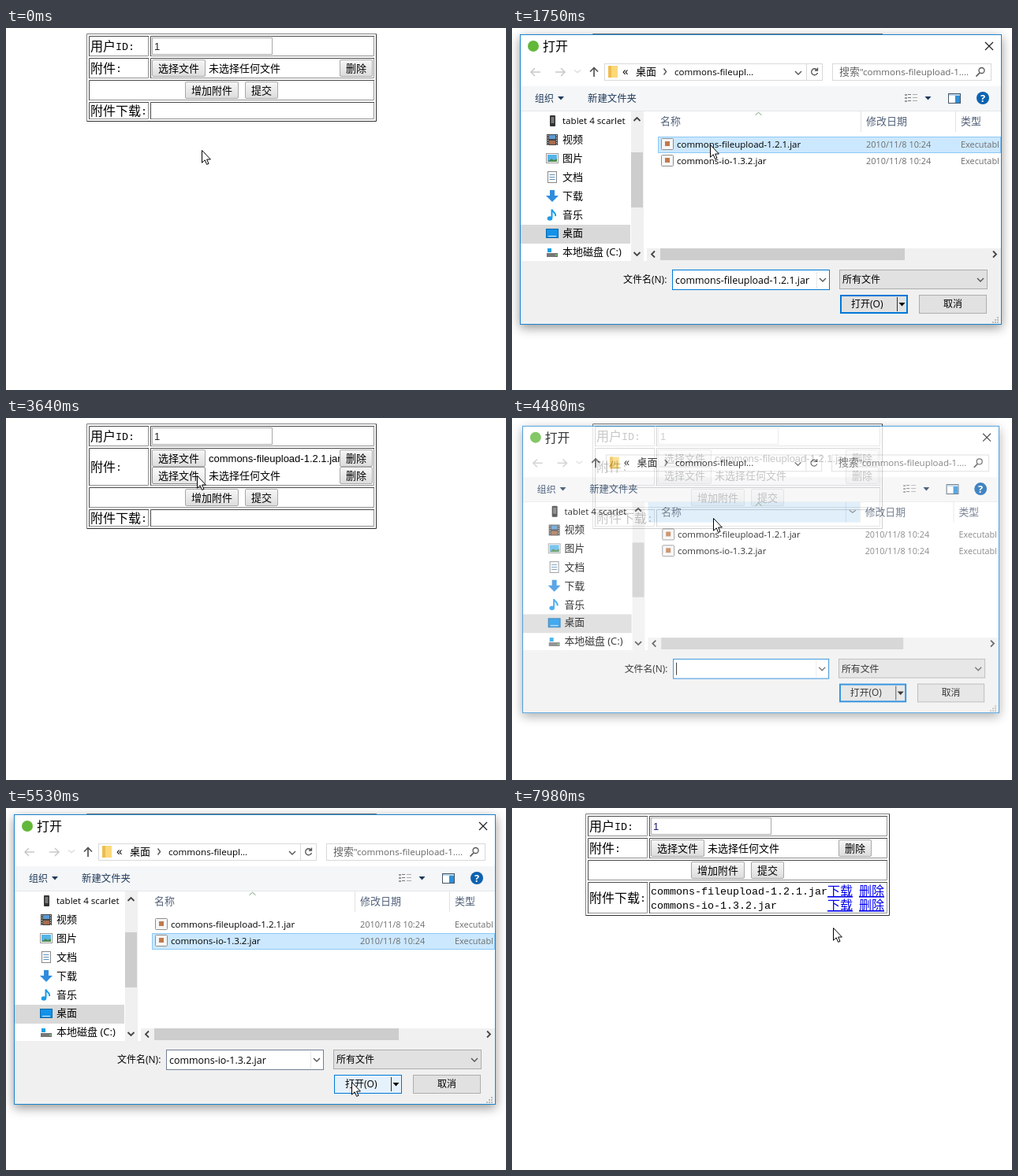
Write an HTML page that moves like this. It is 634x460 px and loops after 8000 ms.

```html
<!DOCTYPE html>
<html lang="zh">
<head>
<meta charset="utf-8">
<title>附件上传</title>
<style>
html, body { margin: 0; width: 100%; height: 100%; overflow: hidden; background: #fff; }
svg { display: block; width: 634px; height: 460px; }
text { white-space: pre; }
.ui { font-family: "Open Sans", "Noto Sans CJK SC", "Noto Sans CJK", sans-serif; }
.form { font-family: "Liberation Sans", "Noto Sans CJK SC", "Noto Sans CJK", sans-serif; }
.label { font-family: "Noto Sans CJK SC", "Noto Sans CJK", sans-serif; font-weight: 300; }
.mono { font-family: "Liberation Mono", monospace; }
.link { text-decoration: underline; text-decoration-thickness: 1px; }
.shadow { filter: drop-shadow(0 4px 7px rgba(0,0,0,.42)); }
</style>
</head>
<body>
<svg id="stage" viewBox="0 0 634 460">
  <defs>
    <linearGradient id="up" x2="0" y2="1"><stop stop-color="#f6f6f6"/><stop offset="1" stop-color="#dcdcdc"/></linearGradient>
    <linearGradient id="over" x2="0" y2="1"><stop stop-color="#fcfcfc"/><stop offset="1" stop-color="#e6e6e6"/></linearGradient>
    <linearGradient id="down" x2="0" y2="1"><stop stop-color="#d6d6d6"/><stop offset="1" stop-color="#ececec"/></linearGradient>
  </defs>
  <g id="page"></g>
  <g id="dialog"></g>
  <path id="cursor" d="M.5.5V16.2L4.2 12.8 6.6 18.4 9 17.4 6.6 12H11.4Z" fill="#fff" stroke="#000"/>
</svg>
<script>
const LOOP = 8000, STEP = 70;
const JARS = ['commons-fileupload-1.2.1.jar', 'commons-io-1.3.2.jar'];
const el = id => document.getElementById(id);

// Time, x, y of the pointer
const POINTER = [
  [280, 248, 155], [630, 214, 47], [980, 214, 47], [1330, 255, 127], [1540, 251, 148],
  [1820, 251, 148], [2310, 436, 351], [2660, 436, 351], [3220, 262, 76], [3430, 262, 76],
  [3920, 212, 68], [4130, 212, 68], [4480, 255, 127], [4690, 256, 169], [4970, 256, 169],
  [5460, 438, 348], [5740, 438, 348], [5810, 427, 336], [6020, 378, 262], [6160, 378, 262],
  [6230, 344, 228], [6370, 298, 125], [6510, 315, 99], [7560, 315, 99], [7770, 370, 236],
  [7980, 407, 152]
];
// Time, opacity, scale of the file dialog
const fade = (start, end) => [
  [start, 0, .94], [start + 70, .35, .966], [start + 140, .78, .99], [start + 210, 1, 1],
  [end, 1, 1], [end + 70, .72, .99], [end + 140, .12, .966], [end + 210, 0, .95]
];
const SESSIONS = [
  { start: 1190, pick: 1680, press: 2450, close: 2520, jar: 0 },
  { start: 4340, pick: 4830, press: 5600, close: 5600, jar: 1 }
];
const PRESSES = [[770, 910], [3360, 3430], [3990, 4060], [6790, 6930]];

function track(keys, t) {
  if (t <= keys[0][0]) return keys[0].slice(1);
  for (let i = 1; i < keys.length; i++) {
    const a = keys[i - 1], b = keys[i];
    if (t <= b[0]) {
      const u = (t - a[0]) / (b[0] - a[0]), e = u * u * (3 - 2 * u);
      return [1, 2].map(k => a[k] + (b[k] - a[k]) * e);
    }
  }
  return keys[keys.length - 1].slice(1);
}

const inside = ([px, py], x, y, x2, y2) => px >= x && px < x2 && py >= y && py < y2;
const fillRect = (x, y, x2, y2, fill, more = '') =>
  `<rect x="${x}" y="${y}" width="${x2 - x}" height="${y2 - y}" fill="${fill}" ${more}/>`;
// Pixel-aligned box with an inner one-pixel border
const box = (x, y, x2, y2, fill, stroke, more = '') =>
  fillRect(x + .5, y + .5, x2 - .5, y2 - .5, fill, `stroke="${stroke}" ${more}`);
const line = (d, stroke, width = 1, more = '') =>
  `<path d="${d}" fill="none" stroke="${stroke}" stroke-width="${width}" ${more}/>`;
const shape = (d, fill) => `<path d="${d}" fill="${fill}"/>`;
const text = (x, y, str, size, fill = '#000', cls = 'ui', more = '') =>
  `<text x="${x}" y="${y}" font-size="${size}" fill="${fill}" class="${cls}" ${more}>${str}</text>`;
const chevron = (x, y, dx, dy, color = '#555', width = 1.4) => line(dx
  ? `M${x - dx / 2} ${y - 4}l${dx} 4l${-dx} 4`
  : `M${x - 4} ${y - dy / 2}l4 ${dy}l4 ${-dy}`, color, width);
const triangle = (x, y, color) => shape(`M${x - 4} ${y - 2}h8l-4 4.5z`, color);

// ---------- web form ----------
function bevel(x, y, x2, y2, light, dark) {
  return line(`M${x + .5} ${y2}V${y + .5}H${x2}`, light) +
    line(`M${x + 1} ${y2 - .5}H${x2 - .5}V${y + 1}`, dark);
}
const cell = (x, y, x2, y2) => bevel(x, y, x2, y2, '#4a4a4a', '#909090');

function drawForm(t, pointer) {
  const saved = t >= 7000, modal = SESSIONS.some(s => t > s.start && t < s.close + 140);
  const pressed = PRESSES.some(([a, b]) => t >= a && t < b);
  const left = saved ? 93 : 102, right = saved ? 479 : 470;
  const mid = left + 81, inner = mid + 2, end = right - 3;
  const none = '未选择任何文件';
  const files = [t >= 2520 && !saved ? JARS[0] : none];
  if (t >= 3430 && !saved) files.push(t >= 5600 ? JARS[1] : none);

  const button = (x, y, w, label) => {
    const over = !modal && inside(pointer, x, y, x + w, y + 22);
    const look = over ? (pressed ? 'down' : 'over') : 'up';
    return box(x, y, x + w, y + 22, `url(#${look})`, over ? '#8c8c8c' : '#a8a8a8', 'rx="1.5"') +
      text(x + w / 2, y + 16, label, 13, '#000', 'form', 'text-anchor="middle"');
  };
  const label = (y, cjk, latin) => text(left + 5, y + 6, cjk, 16, '#000', 'label') +
    text(left + 5 + cjk.length * 16, y + 5, latin, 13.33, '#000', 'mono');

  let top = 10;
  const rows = [26, 4 + files.length * 22, 26, saved ? 40 : 22].map(height => {
    const row = { top, bottom: top + height, mid: top + height / 2 };
    top += height + 2;
    return row;
  });
  let out = bevel(left, 7, right, top + 1, '#808080', '#303030');
  rows.forEach((r, i) => {
    out += i === 2 ? cell(left + 3, r.top, end, r.bottom)
      : cell(left + 3, r.top, left + 79, r.bottom) + cell(mid, r.top, end, r.bottom);
  });
  out += label(rows[0].mid, '用户', 'ID:') + label(rows[1].mid, '附件', ':') + label(rows[3].mid, '附件下载', ':');
  out += box(inner, 12, inner + 153, 34, '#fff', '#aaa') +
    text(inner + 3, 28, '1', 13, saved ? '#1a1a70' : '#222', 'form');
  files.forEach((name, i) => {
    const y = 40 + i * 22;
    out += text(inner + 72, y + 16, name, 13, '#000', 'form') +
      button(inner, y, 68, '选择文件') + button(inner + 238, y, 42, '删除');
  });
  out += button(227, rows[2].top + 2, 68, '增加附件') + button(303, rows[2].top + 2, 42, '提交');
  if (saved) JARS.forEach((name, i) => {
    const y = 105 + i * 18;
    out += text(inner, y + 5, name, 13.33, '#000', 'mono') +
      text(400, y + 6, '下载', 16, '#0000ee', 'label link') +
      text(440, y + 6, '删除', 16, '#0000ee', 'label link');
  });
  return out;
}

// ---------- file dialog ----------
function drawNav() {
  const names = ['tablet 4 scarlet', '视频', '图片', '文档', '下载', '音乐', '桌面', '本地磁盘 (C:)'];
  const icons = [
    fillRect(48, 111, 55, 125, '#333', 'rx="1"') + fillRect(49.5, 113, 53.5, 121, '#777'),
    fillRect(44, 135, 58, 149, '#444') + fillRect(47, 136, 55, 141, '#5b9bd5') + fillRect(47, 143, 55, 148, '#a86b4c') +
      line('M45.5 136V149M56.5 136V149', '#ddd', 1, 'stroke-dasharray="1.5"'),
    box(43, 159, 59, 172, '#fff', '#999') + fillRect(45, 161, 57, 170, '#55b4e8') + shape('M45 170l5-4 3 2 4-2v4z', '#4f8a50'),
    box(45, 182, 57, 197, '#fff', '#888') + line('M47.5 186.5H54.5M47.5 189.5H54.5M47.5 192.5H54.5', '#5d8fb8'),
    shape('M48 206h6v7h5l-8 8-8-8h5z', '#2f8ddd'),
    line('M50.5 241V230.5C51 234 56 234 55 239', '#1e9be8', 2) + '<ellipse cx="48" cy="242" rx="3.3" ry="2.7" fill="#1e9be8"/>',
    box(43, 255, 59, 267, '#1292e8', '#0b69aa') + fillRect(46, 264, 56, 265, '#d8efff'),
    fillRect(44, 286, 58, 291, '#777') + fillRect(45, 280, 50, 285, '#18a0e8') + fillRect(55, 288, 57, 289, '#6f6')
  ];
  let out = fillRect(11, 250, 150, 274, '#d9d9d9');
  names.forEach((name, i) => {
    const y = Math.round(118 + i * 23.9);
    out += icons[i] + text(64, y + 4, name, i ? 13 : 11.6);
  });
  return out + fillRect(151, 106, 167, 296, '#f0f0f0') + fillRect(151, 158, 166, 228, '#cdcdcd') +
    chevron(158.5, 116, 0, -4, '#444', 1.8) + chevron(158.5, 287, 0, 4, '#444', 1.8);
}

function drawHead(active) {
  const grey = '#c9c9c9';
  const arrow = (x, dir, color) => line(`M${x - 6 * dir} 56H${x + 6 * dir}M${x + dir} 51l${5 * dir} 5l${-5 * dir} 5`, color, 1.5);
  return (active ? '<circle cx="27" cy="23" r="7" fill="#62b83a"/>' : '') +
    text(active ? 39 : 20, 29, '打开', 16) + line('M600 18l10 10M610 18l-10 10', '#222', 1.2) +
    arrow(30, -1, grey) + arrow(61, 1, grey) + chevron(83, 55, 0, 3, '#ddd') +
    line('M104 62V51M99 55.5l5-5 5 5', '#555', 1.7) +
    box(117, 45, 394, 67, '#fff', '#d9d9d9') + line('M373.5 45V67', '#d9d9d9') +
    fillRect(122, 48, 134, 63, '#fbd878') + fillRect(122, 48, 126, 63, '#eebd4f') +
    text(140, 60, '«', 15) + text(157, 60, '桌面', 13) + chevron(194, 55.5, 3, 0) +
    text(206, 60, 'commons-fileupl...', 11.6) + chevron(363, 57, 0, 4) +
    line('M387 53.5A4 4 0 1 0 387.5 57M387.5 50.5V54H384', '#555', 1.3) +
    box(406, 45, 608, 67, '#fff', '#d9d9d9') + text(415, 60, '搜索', 13, '#666') +
    text(441, 60, '"commons-fileupload-1....', 11.6, '#666') +
    '<circle cx="595.5" cy="54" r="3.5" fill="none" stroke="#555" stroke-width="1.3"/>' + line('M593 57l-4.5 4.5', '#555', 1.7) +
    fillRect(11, 74, 620, 105, '#f5f6f7') + line('M11 105.5H620', '#e6e7e8') +
    text(29, 94, '组织', 12, '#1e395b') + triangle(62, 89, '#1e395b') + text(96, 94, '新建文件夹', 12.4, '#1e395b') +
    [84, 88, 92].map(y => fillRect(498, y, 501, y + 2, '#999') + fillRect(502, y, 506, y + 1, '#777') + fillRect(508, y, 514, y + 1, '#aaa')).join('') +
    triangle(527.5, 89, '#1e395b') +
    box(553, 83, 569, 96, '#fff', '#456') + fillRect(554, 84, 568, 86, '#b8d4ea') + fillRect(562, 86, 568, 95, '#2e8fd8') +
    '<circle cx="597" cy="89" r="8" fill="#0c62b0"/>' +
    text(597, 94, '?', 13, '#fff', 'ui', 'text-anchor="middle" font-weight="700"');
}

function drawList(s, t, pointer) {
  const picked = t >= s.pick, lost = t >= s.close, overHead = inside(pointer, 188, 106, 442, 132);
  const heading = '#53627a', detail = '#6d6d6d';
  let out = overHead ? fillRect(171, 106, 442, 132, '#d9ebf9') + line('M424.5 106V132', '#b9d7ee') + chevron(433, 118, 0, 3, '#777') : '';
  out += line('M442.5 106V132M562.5 106V132', '#e2e2e2') + chevron(312.5, 109, 0, -3.5, '#6c9c77', 1) +
    text(188, 123, '名称', 13, heading) + text(449, 123, '修改日期', 13, heading) + text(569, 123, '类型', 13, heading);
  JARS.forEach((name, i) => {
    const y = 138 + i * 21;
    if (picked && s.jar === i) out += box(185, y, 620, y + 21, lost ? '#d9d9d9' : '#cce8ff', lost ? '#d9d9d9' : '#8cc8f5');
    else if (inside(pointer, 185, y, 620, y + 21)) out += fillRect(185, y, 620, y + 21, '#e5f3ff');
    out += box(189, y + 2, 205, y + 17, '#f6f6f6', '#8f8f8f', 'rx="1"') + fillRect(194, y + 6, 200, y + 12, '#c07a4e') +
      text(209, y + 14, name, 11.5) + text(449, y + 14, '2010/11/8 10:24', 10.9, detail) +
      text(569, y + 14, 'Executabl', 10.9, detail);
  });
  return out + fillRect(171, 280, 620, 296, '#f0f0f0') + fillRect(188, 280, 498, 295, '#cdcdcd') +
    chevron(179, 287.5, -4, 0, '#444', 1.8) + chevron(612, 287.5, 4, 0, '#444', 1.8);
}

function drawFoot(s, t, pointer) {
  const picked = t >= s.pick, lost = t >= s.close, focus = t <= s.pick + 140;
  const over = inside(pointer, 416, 339, 502, 363), down = t >= s.press;
  const name = JARS[s.jar], face = down ? '#cce4f7' : over ? '#e5f1fb' : '#e1e1e1';
  let out = fillRect(11, 296, 620, 376, '#f0f0f0') + text(141, 324, '文件名(N):', 12) +
    box(203, 307, 403, 333, '#fff', focus ? '#0078d7' : '#718096') +
    line('M386.5 309V331', '#e8e8e8') + chevron(394, 320, 0, 4);
  if (lost) out += fillRect(207, 311, 377, 329, '#1e90ff');
  out += picked ? text(207, 325, name, 12.45, lost ? '#fff' : '#000') : line('M207.5 312V328', '#000');
  out += box(415, 307, 603, 332, '#e1e1e1', '#adadad') + text(419, 324, '所有文件', 12) + chevron(594, 320, 0, 4);
  out += over || down ? box(416, 339, 502, 363, face, '#0078d7')
    : fillRect(417, 340, 501, 362, face, 'stroke="#0078d7" stroke-width="2"');
  out += line('M488.5 342V360', '#333') + triangle(494.5, 351, '#000') + text(430, 355, '打开(O)', 12) +
    box(516, 339, 602, 363, '#e1e1e1', '#adadad') + text(547, 355, '取消', 12);
  for (let i = 0; i < 3; i++) for (let j = 0; j <= i; j++)
    out += fillRect(615 - j * 3, 367 + i * 3, 617 - j * 3, 369 + i * 3, '#bbb');
  return out;
}

function drawDialog(t, pointer) {
  const s = SESSIONS.find(d => t > d.start && t < d.close + 210);
  if (!s) return '';
  const [alpha, scale] = track(fade(s.start, s.close), t);
  return `<g opacity="${alpha}" transform="translate(315.5 192.5) scale(${scale}) translate(-315.5 -192.5)">` +
    fillRect(10, 8, 621, 377, '#fff', 'class="shadow"') +
    drawHead(t < s.close) + drawNav() + drawList(s, t, pointer) + drawFoot(s, t, pointer) +
    box(10, 8, 621, 377, 'none', '#1a83d0') + '</g>';
}

let shown = -1;
function render(now) {
  const t = Math.floor((now % LOOP) / STEP) * STEP;
  if (t === shown) return;
  shown = t;
  const pointer = track(POINTER, t);
  el('page').innerHTML = drawForm(t, pointer);
  el('dialog').innerHTML = drawDialog(t, pointer);
  el('cursor').setAttribute('transform', `translate(${pointer.map(Math.round).join(' ')})`);
}
const begin = performance.now();
function frame() {
  render(performance.now() - begin);
  requestAnimationFrame(frame);
}
render(0);
requestAnimationFrame(frame);
</script>
</body>
</html>
```
